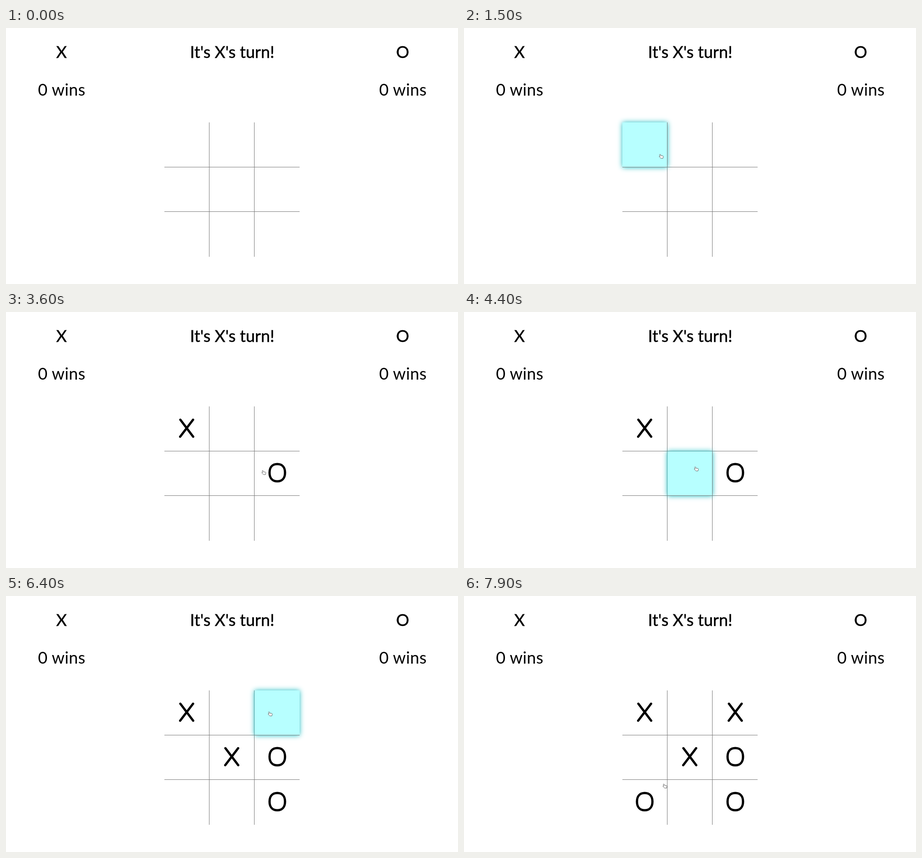
Recreate the animation shown at these times as an HTML page. Size 993 px wide and 564 px high, loop 8000 ms.

```html
<!DOCTYPE html>
<html lang="en">
<head>
<meta charset="utf-8">
<title>Tic-tac-toe</title>
<style>
  html, body { margin: 0; width: 100%; height: 100%; overflow: hidden; background: #fff; }
  .stage { position: relative; width: 993px; height: 564px; overflow: hidden; }
  .layer { position: absolute; left: 0; top: 0; }
  text { font: 400 36px Nunito, Lato, "Open Sans", sans-serif; text-anchor: middle; }
  .head { stroke: #000; stroke-width: .5px; }
  .wins { letter-spacing: .4px; }
  .board {
    position: absolute; left: 348px; top: 208px;
    display: grid; grid-template: 99px 98px 99px / repeat(3, 99px);
  }
  .cell {
    box-sizing: border-box;
    display: flex; align-items: center; justify-content: center;
    border: 0 solid #7a7a7a;
  }
  .cell:not(:nth-child(3n)) { border-right-width: 1px; }
  .cell:nth-child(-n+6) { border-bottom-width: 1px; }
  .hover { position: relative; background: #b7ffff; box-shadow: 0 0 11px #1bbcc2; }
  .cell svg { width: 50px; height: 50px; margin-top: -3px; }
  .cell path { fill: none; stroke: #000; stroke-width: 5; stroke-linecap: round; }
</style>
</head>
<body>
<div class="stage">
  <svg class="layer" width="993" height="564">
    <text class="head" x="122" y="66">X</text>
    <text class="head" id="turn" x="497" y="66">It's X's turn!</text>
    <text class="head" x="871.5" y="66">O</text>
    <text class="wins" x="122.4" y="149">0 wins</text>
    <text class="wins" x="872" y="149">0 wins</text>
  </svg>
  <div class="board" id="board"></div>
  <svg class="layer" width="993" height="564">
    <path id="hand" fill="#fff" stroke="#444" stroke-width=".8" stroke-linejoin="round"
      d="M-2.8-4.6q1-.7 1.6.4l1 2.4 4 .4q1.2.4 1.1 1.6l-.8 4h-4.6l-3.6-4q0-1.2 1.4-.7l.7.5-1.2-3.4q-.1-.9.4-1.2z"/>
  </svg>
</div>
<script>
const LOOP = 8000, STEP = 100, PAUSE = 200;

// The pointer glides from stop to stop and rests a little after each click.
const stops = [
  { at: 100, x: 566, y: 492 },
  { at: 1100, x: 433, y: 283, click: 1700 },
  { at: 2600, x: 529, y: 435 },
  { at: 2900, x: 566, y: 354, click: 3600 },
  { at: 4400, x: 510, y: 346, click: 4500 },
  { at: 5100, x: 507, y: 427 },
  { at: 5300, x: 572, y: 437, click: 5500 },
  { at: 6400, x: 580, y: 260, click: 6600 },
  { at: 7300, x: 500, y: 430 },
  { at: 7700, x: 441, y: 419, click: 7900 }
];
const clicks = stops.filter(s => s.click);

const shapes = {
  X: "M11 6.3L39.2 43.7M39 6.3L10.6 43.7",
  O: "M25 6C36.5 6 42 14 42 25S36.5 44 25 44 8 36 8 25 13.5 6 25 6Z"
};

const board = document.getElementById("board");
const turn = document.getElementById("turn");
const hand = document.getElementById("hand");
const cells = Array.from({ length: 9 }, () => {
  const cell = document.createElement("div");
  cell.className = "cell";
  cell.innerHTML = '<svg viewBox="0 0 50 50"><path/></svg>';
  board.append(cell);
  return cell;
});

const ease = k => k * k * (3 - 2 * k);
const cellAt = ({ x, y }) => Math.floor((y - 208) / 98.6) * 3 + Math.floor((x - 348) / 99);

function pointerAt(t) {
  const i = stops.findLastIndex(s => s.at <= t);
  if (i < 0) return null;
  const a = stops[i], b = stops[i + 1] || a;
  const leave = a.click ? a.click + PAUSE : a.at;
  if (t <= leave || a === b) return a;
  const e = ease((t - leave) / (b.at - leave));
  return { x: a.x + (b.x - a.x) * e, y: a.y + (b.y - a.y) * e };
}

function draw(t) {
  const done = clicks.filter(s => s.click <= t);
  const marks = {};
  done.forEach((s, i) => { marks[cellAt(s)] = i % 2 ? "O" : "X"; });
  turn.textContent = `It's ${done.length % 2 ? "O" : "X"}'s turn!`;

  const pos = pointerAt(t);
  hand.style.display = pos ? "" : "none";
  if (pos) hand.setAttribute("transform", `translate(${pos.x} ${pos.y})`);

  const over = pos ? cellAt(pos) : -1;
  cells.forEach((cell, i) => {
    cell.classList.toggle("hover", i === over && !marks[i]);
    cell.querySelector("path").setAttribute("d", shapes[marks[i]] || "");
  });
}

const start = performance.now();
let last = -1;
function tick() {
  const t = Math.floor((performance.now() - start) % LOOP / STEP) * STEP;
  if (t !== last) draw(last = t);
  requestAnimationFrame(tick);
}
tick();
</script>
</body>
</html>
```
